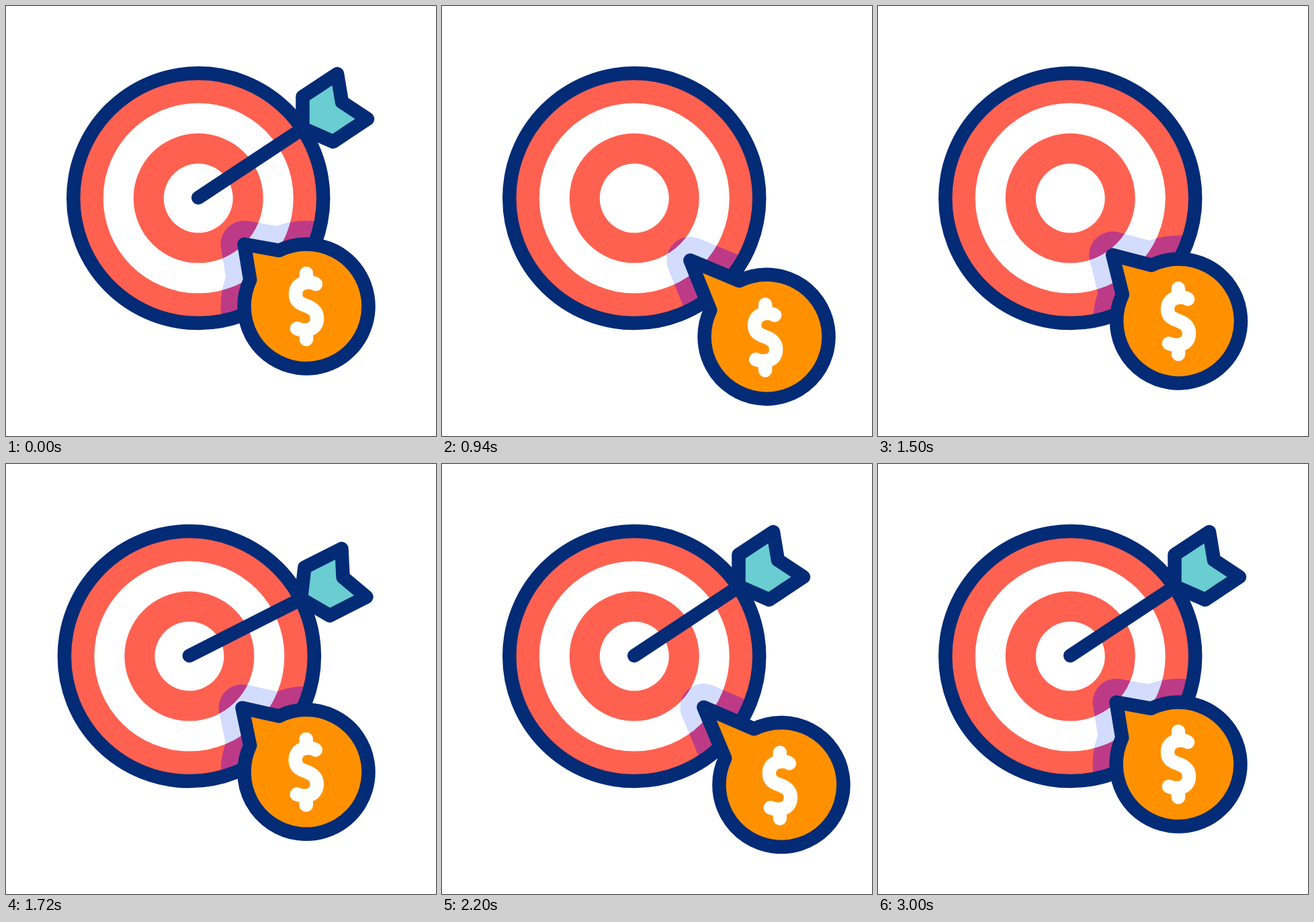
These frames come from a looping animation (640 by 640 pixels, 3.6 s). An HTML page:

```html
<!DOCTYPE html>
<html lang="en">
<head>
<meta charset="utf-8">
<title>Target and coin</title>
<style>
  html, body { margin: 0; width: 100%; height: 100%; overflow: hidden; background: #fff; }
  svg { display: block; width: 100%; height: 100%; }
  .line { stroke: #032b76; stroke-width: 20.5; stroke-linecap: round; stroke-linejoin: round; }
</style>
</head>
<body>
<svg viewBox="0 0 640 640">
  <defs>
    <mask id="halo" maskUnits="userSpaceOnUse" x="0" y="0" width="640" height="640">
      <path class="bubble" fill="#fff" stroke="#fff" stroke-width="70" stroke-linejoin="round"/>
    </mask>
  </defs>
  <g class="target" id="rings"></g>
  <g mask="url(#halo)"><g class="target" id="shade"></g></g>
  <g class="target"><circle class="line" cx="286.25" cy="286.1" r="186" fill="none"/></g>
  <g id="arrow" class="line">
    <path d="M286.3 285.3L441 183" fill="none"/>
    <path d="M441.5 135L493 101L500 143L538 168L487 202L441.5 182Z" fill="#69cdd1"/>
  </g>
  <path class="bubble line" fill="#ff9100"/>
  <path id="dollar" fill="none" stroke="#fff" stroke-width="20.5" stroke-linecap="round" stroke-linejoin="round"
    d="M0-49V-36M14-33C7-38-16-38-16-18C-16-4-4-3 2 0C9 3 16 7 16 18C16 36-2 38-14 33M0 36V49"/>
</svg>
<script>
const LOOP = 3600, REST = 447;
const DROP = 40, GONE = 460, LAUNCH = 1540, HIT = 1660, SWING = 270;
const $ = id => document.getElementById(id);
const all = sel => [...document.querySelectorAll(sel)];

function drawRings(id, outer, inner) {
  $(id).innerHTML = [184, 141.5, 96.5, 51.5].map((r, i) =>
    `<circle cx="286.25" cy="286.1" r="${r}" fill="${i % 2 ? inner : outer}"/>`).join('');
}
drawRings('rings', '#ff6150', '#fff');
drawRings('shade', '#bd3b86', '#d3dcfd');

// Sum of sine-eased moves, each [start, end, distance].
const ease = u => (1 - Math.cos(Math.PI * Math.min(1, Math.max(0, u)))) / 2;
const travel = (t, moves) =>
  moves.reduce((sum, [from, to, by]) => sum + by * ease((t - from) / (to - from)), 0);

const driftX = t => travel(t, [[150, 760, 41], [760, 1560, -41], [1745, 2335, 66], [2335, 2980, -66]]);
const driftY = t => travel(t, [[40, 420, -7], [420, 1010, 54], [1010, 1800, -36.5],
  [1800, 2390, 26], [2390, 2980, -36.5]]);

// Two damped swings after the impact.
function recoil(t, size, decay) {
  const u = t - HIT;
  if (u < 0 || u > 2 * SWING) return 0;
  return size * Math.exp(-u / decay) * Math.sin(2 * Math.PI * u / SWING);
}
const shake = t => recoil(t, -20.3, 150);
const wobble = t => recoil(t, 8.2, 300);

function arrowPose(t) {
  if (t < GONE) {
    const u = Math.max(0, (t - DROP) / (GONE - DROP));
    return { x: 0, y: 620 * u * u, turn: 35 * u };
  }
  const away = 3 * Math.max(0, (HIT - t) / (HIT - LAUNCH));
  return { x: 155 * away + shake(t), y: -102 * away, turn: wobble(t) };
}

function render(t) {
  const dx = driftX(t), dy = driftY(t), x = REST + dx, y = REST + dy;
  const stretch = 0.26 * (dx + dy), tip = 92.5 + stretch, pull = 0.09 * stretch;
  const outline = `M${x - 40.5} ${y - 83.2}A92.5 92.5 0 1 1 ${x - 83.7} ${y - 39.4}L${x - tip} ${y - tip}Z`;
  all('.bubble').forEach(el => el.setAttribute('d', outline));
  $('dollar').setAttribute('transform', `translate(${x - pull} ${y + pull / 2})`);
  all('.target').forEach(el => el.setAttribute('transform', `translate(${shake(t)} 0)`));

  const pose = arrowPose(t);
  $('arrow').setAttribute('transform', `translate(${pose.x} ${pose.y}) rotate(${pose.turn} 286.3 285.3)`);
  $('arrow').setAttribute('visibility', t >= GONE && t < LAUNCH ? 'hidden' : 'visible');
}

const start = performance.now();
function tick() {
  render((performance.now() - start) % LOOP);
  requestAnimationFrame(tick);
}
tick();
</script>
</body>
</html>
```
